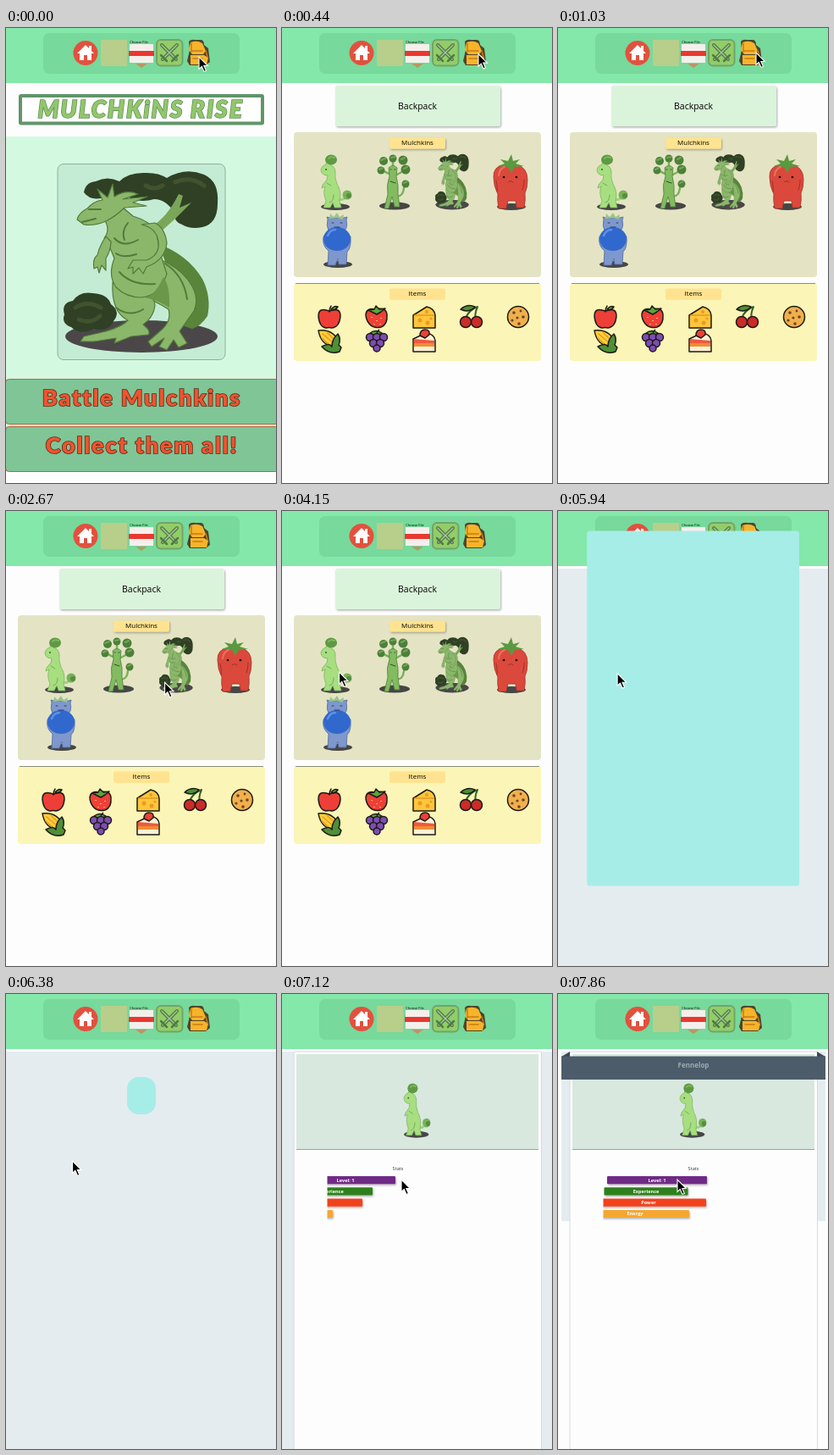
These frames come from a looping animation (319x537 px, 8 s). An HTML page:

```html
<!DOCTYPE html>
<html lang="en">
<head>
<meta charset="utf-8">
<title>Mulchkins Rise</title>
<style>
html, body { margin: 0; height: 100%; overflow: hidden; background: #fdfdfd; }
svg { display: block; width: 100%; height: 100%; }
text { text-anchor: middle; font-family: "Open Sans", "Noto Sans", sans-serif; }
.fancy { font: 900 27px Lato, sans-serif; letter-spacing: 1.8px; fill: #ee5430; stroke: #5a2a18; stroke-width: 1.6px; paint-order: stroke; }
.title { font: italic 900 28px Lato, sans-serif; letter-spacing: 1.9px; fill: #93c66c; stroke: #5d9055; stroke-width: 1.5px; paint-order: stroke; }
.small { font-size: 8px; }
.tiny text { font: 700 5.6px "Open Sans", sans-serif; fill: #fff; }
.food { stroke: #1d1a16; stroke-width: 1.5; stroke-linejoin: round; }
.line { fill: none; stroke-linecap: round; }
</style>
</head>
<body>
<svg viewBox="0 0 319 537" preserveAspectRatio="none">
<defs>
  <filter id="shade" x="-10%" y="-20%" width="120%" height="160%"><feDropShadow dx="1" dy="1.5" stdDeviation="1.2" flood-opacity=".3"/></filter>
  <clipPath id="barClip"><rect x="53.5" y="190" width="214" height="90"/></clipPath>

  <g id="dragon">
    <ellipse cx="160" cy="364" rx="90" ry="19" fill="#4b4749"/>
    <g fill="#2f4025">
      <path d="M92 194q2-12 14-13q14-7 28 0q10-10 28-10q18-1 28 6q22-13 44-4q18 8 16 34q0 24-18 28q-14 3-24-3q-10-3-9-14q-10-16-24-16q-16 5-30-2q-14 5-26-1q-18 7-27-5z"/>
      <path d="M69 338q-4-14 10-16q8-12 24-9q17 1 21 13q12 9 3 20q-5 13-23 9q-17 8-27-2q-12-4-8-15z"/>
    </g>
    <path d="M200 182q18-8 34 4M165 186q10 6 20 0M82 330q14-9 30 0M86 344q14 6 25-4" class="line" stroke="#40532f" stroke-width="5"/>
    <path d="M172 234q18-10 32-38l5 2-4 14 14-6-20 20-18 16z" fill="#7aa659"/>
    <path d="M180 255q34 12 52 41q11 22 6 44q-8 12-18 15l-15-5q9-30-9-54z" fill="#58853a"/>
    <g fill="#8bb76b" stroke="#527a3a" stroke-width="1.2" stroke-linejoin="round">
      <path d="M150 268q40 0 64 28q16 20 8 38q-10 14-17 24l9 14-10 5-6-9-8 12-9-4 6-10-15 10-4-6 16-14q12-11 8-24q-16-10-32-16z"/>
      <path d="M126 300q14 18 34 12q16 4 16 16q-2 14-14 22q10 8 6 12l-20 2-20 8 2-6-26 4h-16l4-6 26-6q20-6 26-13q-20-10-18-45z"/>
      <path d="M116 226q8 12 0 22q8 12 12 24q-8 20 2 34q12 12 30 12q22-2 30-28q-10-28-12-50q-8-12-28-18q-10-8-18-16z"/>
      <path d="M84 226q2-8 12-13q8-9 18-10l-6-13 12 10 6-16 2 15q14-9 28-3l-18 6 29-3-17 7 16 4-26 2q-10 10-22 16q-14 6-26 4z"/>
      <path d="M118 246q-8 12-10 22q-6 4-4 16l4-2 2 7 3-9 5 6v-14q6-10 6-20z"/>
      <path d="M160 232q18 4 20 20q2 16-14 22h-16l-6 10 6-2v8l7-7 5 7 4-8q22-8 24-28q-2-18-14-24z"/>
    </g>
    <path d="M128 248q10 12 28 2M130 266q8 6 24 1M134 288q14 16 42 14M144 230q-8 10-4 20M188 278q22 14 26 42M130 330q16 12 32 2M98 214l14 0M90 229l16-4" class="line" stroke="#527a3a" stroke-width="2"/>
    <path d="M164 318q12-2 22-24q8 10 7 36q-14-9-29-12z" fill="#6a9749"/>
  </g>

  <g id="sprout">
    <ellipse cx="20" cy="62" rx="17" ry="4" fill="#454645"/>
    <path d="M23 53q7 2 9-3" class="line" stroke="#9dd577" stroke-width="3"/>
    <circle cx="34" cy="48" r="5.5" fill="#77b257"/><circle cx="36" cy="49" r="3" fill="#588d40"/>
    <path d="M3 19q0-5 6-7l1-5 3 5q7 2 7 9q-1 7 2 14q6 10 3 20l2 8h-8l-2-6-3 6H6l3-8q-4-9-1-17l-4 2 1-4 5-6 1-5q-7 0-8-6z" fill="#a6de80" stroke="#78ad5a" stroke-width=".7"/>
    <path d="M10 34l5 3M13 57q5-1 5-9" class="line" stroke="#75ab58"/>
    <ellipse cx="15" cy="6.500" rx="7" ry="6" fill="#5e9a43"/><path d="M12 5q3-3 7-1" class="line" stroke="#7eb85c" stroke-width="2"/>
    <circle cx="9" cy="18" r=".9" fill="#33492a"/>
  </g>

  <g id="arrow"><path d="M0 0V14.5L3.3 11.4 6 17.4 8.4 16.4 5.8 10.5H10.4Z" stroke="#fff" stroke-width="1.1"/></g>
</defs>

<rect width="319" height="537" fill="#fdfdfd"/>

<g id="home">
  <rect y="128" width="319" height="396" fill="#d3fae1"/>
  <rect x="17" y="80" width="286" height="32.5" rx="1" fill="#fff" stroke="#619568" stroke-width="4"/>
  <text class="title" x="159" y="106">MULCHKiNS RISE</text>
  <rect x="61" y="160.500" width="198" height="231" rx="7" fill="#c4ecd4" stroke="#91ad9b"/>
  <use href="#dragon"/>
  <g fill="#7fc596" stroke="#b5653f">
    <rect x="-.5" y="414.500" width="323" height="53" rx="4"/>
    <rect x="-.5" y="470.500" width="323" height="53" rx="4"/>
  </g>
  <text class="fancy" x="160.500" y="446">Battle Mulchkins</text>
  <text class="fancy" x="160.500" y="502">Collect them all!</text>
</g>

<g id="pack">
  <rect x="63" y="68" width="195" height="48" rx="3" fill="#daf4db" filter="url(#shade)"/>
  <text x="160" y="96" font-size="10.500">Backpack</text>
  <rect x="14" y="123" width="292" height="171" rx="4" fill="#e4e4c4"/>
  <rect x="14" y="301" width="292" height="92" rx="4" fill="#fbf5b7"/>
  <path d="M16 301.500H304" stroke="#8b8a76"/>
  <g fill="#ffe390"><rect x="127" y="129.500" width="66" height="13" rx="2" filter="url(#shade)"/><rect x="127" y="307.500" width="66" height="13.500" rx="2"/></g>
  <text class="small" x="160" y="138">Mulchkins</text>
  <text class="small" x="160" y="316">Items</text>

  <use href="#sprout" x="43" y="149"/>

  <g transform="translate(112 149)">
    <ellipse cx="21" cy="61" rx="18" ry="4.500" fill="#454645"/>
    <path d="M23 50q8 0 9-10M19 25L8 20M22 25l11-6M19 18V9" class="line" stroke="#79b259" stroke-width="2.5"/>
    <path d="M14 16q5-5 10 0l-1 10q3 10 2 21l2 15h-6l-3-12-4 14H9l4-17q-2-11 2-21z" fill="#82bb60" stroke="#527f3d" stroke-width=".8"/>
    <g fill="#4d803a"><circle cx="8" cy="8" r="5"/><circle cx="19" cy="5" r="4.500"/><circle cx="31" cy="7" r="5.500"/><circle cx="5" cy="19" r="4.500"/><circle cx="34" cy="18" r="5.500"/><circle cx="34" cy="35" r="4.500"/></g>
    <path d="M5 7l5-2M17 4l5-1M29 6l4-2M3 18l4-2M32 17l4-2M32 34l4-2" class="line" stroke="#71a554" stroke-width="2"/>
    <path d="M16 18h1m4 0h1M16 32l6 2" class="line" stroke="#32502a"/>
  </g>

  <use href="#dragon" transform="translate(181 149) scale(.218 .307) translate(-68 -170)"/>

  <g transform="translate(249 149)">
    <ellipse cx="22" cy="62" rx="17" ry="4" fill="#454645"/>
    <path d="M1 27q-1-13 14-15h12q14 3 14 18q0 10-3 16q1 8-1 17h-9l-1-8h-9l-2 9H7q-2-10-1-17q-5-9-5-20z" fill="#db493c" stroke="#a53228" stroke-width=".8"/>
    <path d="M6 14l8-3-5-5 9 2 4-8 2 8 8-2-5 5 10 3-11 1-4 7-4-7z" fill="#5a9940"/>
    <path d="M4 31q2 9 1 13M37 30q0 8-2 12M18 33q3-3 6 0" class="line" stroke="#9d3028"/>
    <circle cx="13" cy="27" r="1.300"/><circle cx="28" cy="27" r="1.300"/>
    <path d="M7 25q1-8 7-10" class="line" stroke="#ea7263" stroke-width="2"/>
  </g>

  <g transform="translate(47 217)">
    <ellipse cx="19" cy="62" rx="17" ry="4" fill="#454645"/>
    <path d="M7 9l-1-3 4 1h16l4-1-1 4q2 8-2 12l7 7q1 14-4 18l-1 15H20l-1-7-3 8H7l1-17Q0 40 2 29l6-7q-3-6-1-13z" fill="#7e97cc" stroke="#526a9e" stroke-width=".8"/>
    <ellipse cx="18" cy="32" rx="16" ry="14" fill="#3168cd"/>
    <path d="M7 28q3-7 9-7" class="line" stroke="#5e90e6" stroke-width="2.500"/>
    <path d="M9 8l1-6 4 4 4-5 3 5 5-3-1 6-7-2z" fill="#9cc48a"/>
    <path d="M12 13h2m8 0h2M15 18h6" class="line" stroke="#2e3d63"/>
  </g>

  <g class="food">
    <g transform="translate(56 341)">
      <path d="M0-7q-13-5-13 6q1 13 9 14q4-1 7 0q9-1 10-14q0-11-13-6z" fill="#ed3f37"/>
      <path d="M0-6q0-4 2-7" class="line"/><path d="M2-9q4-5 8-3q-3 5-8 3z" fill="#64ae38"/>
    </g>
    <g transform="translate(112 341)">
      <path d="M-13-3q1-8 11-6q13-3 14 6q1 12-7 15q-9 2-14-4q-4-5-4-11z" fill="#ef4037"/>
      <path d="M-10-8l7-1 2-4 4 4 7-1-5 4-5 3-4-2z" fill="#5ba638"/>
      <path d="M-6 0v1M0 4v1M5 1v1M-3 8v1M4 8v1" stroke="#ffd27a"/>
    </g>
    <g transform="translate(168 341)">
      <path d="M-13-2L3-12q9 2 10 10v15h-26z" fill="#ffc63b"/><path d="M-12-2h24" stroke="#e09a25"/>
      <g fill="#e89b24" stroke="none"><circle cx="-5" cy="4" r="2.500"/><circle cx="4" cy="7" r="2.500"/><circle cx="8" cy="2" r="1.500"/><circle cx="3" cy="-6" r="2"/></g>
    </g>
    <g transform="translate(223 341)">
      <path d="M-6 2Q-3-8 8-12Q4-3 6 3" class="line" stroke="#35602a" stroke-width="2"/>
      <path d="M-12-9q8-7 17-3q-7 8-17 3z" fill="#4d8f36"/>
      <circle cx="-6" cy="6" r="6.500" fill="#cb2c28"/><circle cx="7" cy="6" r="6.500" fill="#cb2c28"/>
    </g>
    <g transform="translate(279 341)">
      <circle r="12.500" fill="#f0b04c"/>
      <g fill="#714321" stroke="none"><circle cx="-5" cy="-5" r="1.800"/><circle cx="3" cy="-7" r="1.400"/><circle cx="6" cy="0" r="1.800"/><circle cx="-1" cy="1" r="1.600"/><circle cx="-7" cy="4" r="1.600"/><circle cx="1" cy="8" r="1.800"/></g>
    </g>
    <g transform="translate(56 369)">
      <path d="M6 7Q-10 6-13-12Q5-14 11 2z" fill="#ffcf3a"/>
      <path d="M-8-8L6 4M-3-10l9 9M-9-3l8 7" class="line" stroke="#e79b22"/>
      <path d="M-9 7q9-5 12 0q0-9 7-15q4 6 1 13l3 3-2 5q-12 4-21-6z" fill="#4f8f37"/>
    </g>
    <g transform="translate(112 369)" fill="#7d4db3">
      <path d="M0-7q0-4 3-6M-8-9Q-1-14 6-9Q-1-4-8-9" fill="#5da43c"/>
      <circle cx="-8" cy="-4" r="4.500"/><circle cx="0" cy="-4" r="4.500"/><circle cx="8" cy="-4" r="4.500"/><circle cx="-4" cy="3" r="4.500"/><circle cx="4" cy="3" r="4.500"/><circle cx="0" cy="9" r="4"/>
    </g>
    <g transform="translate(168 369)">
      <path d="M-13-2L2-9q10 1 11 9v13h-26z" fill="#fff2d6"/>
      <path d="M-12 3h24v4h-24z" fill="#f28c35" stroke="none"/><path d="M-12-2L12 0v3h-24z" fill="#ee5a3e" stroke="none"/>
      <path d="M-5-6q0-7 6-7t5 6l-5 4z" fill="#ec4038"/>
    </g>
  </g>
</g>

<g id="detail">
  <rect id="backdrop" y="68" width="319" height="469" fill="#e4ecf0"/>
  <g id="card">
    <rect x="14" y="68" width="292.500" height="471" rx="2" fill="#fdfdfd" stroke="#d5dade"/>
    <rect x="17" y="71" width="286" height="112" fill="#d8e8df"/>
    <path d="M17 183.500H303" stroke="#98a59e"/>
    <use href="#sprout" transform="translate(141.500 105) scale(.86 .98)"/>
    <text id="stats" y="208" font-size="5.600" fill="#333">Stats</text>
    <g id="bars" class="tiny" clip-path="url(#barClip)"></g>
    <g id="ribbon">
      <path d="M4 74L14 68V74ZM316 74L306 68V74Z" fill="#3c4954"/>
      <rect x="4" y="73.500" width="312" height="27.500" fill="#4d5c6a"/>
      <text x="160" y="87" font-size="8" font-weight="700" fill="#a0aab2">Fennelop</text>
    </g>
  </g>
</g>

<g id="nav">
  <rect width="319" height="65" fill="#84e8aa"/>
  <rect x="44" y="6" width="232" height="48" rx="7" fill="#77d99b"/>
  <circle cx="94" cy="29.500" r="14.500" fill="#e2513e"/>
  <path d="M84 30l10-10 4 4v-3h3v6l3 3h-3v8h-5v-6h-4v6h-5v-8z" fill="#fff"/>
  <rect x="112" y="14" width="31" height="31" fill="#b8cf8b"/>
  <path d="M153 42h14l-7 5z" fill="#b49865"/>
  <rect x="146" y="19" width="28" height="22" fill="#f5efec"/>
  <rect x="145" y="27" width="30" height="6" fill="#e8382f"/>
  <text x="157" y="17.500" font-size="4">Choose File</text>
  <rect x="178" y="14" width="30.500" height="30.500" rx="5" fill="#92cd68" stroke="#70a56a" stroke-width="2"/>
  <g class="line"><path d="M184 20l17 17M202 20l-17 17" stroke="#517a47" stroke-width="4"/><path d="M184 20l17 17M202 20l-17 17" stroke="#a5c69a" stroke-width="1.500"/><path d="M183 32l7 7M203 32l-7 7" stroke="#517a47" stroke-width="2.500"/></g>
  <path d="M216 16q2-3 8-2h7q3 1 3 6l5 4 2 16-5 4h-19l-3-5 3-13z" fill="#4e4430"/>
  <path d="M218 17q8-3 14 1l4 9-3 4h-13l-4-5zM218 32h16l5 3-2 8h-19z" fill="#f6b42b"/>
  <path d="M219 27h13M221 36h11M219 18v10M236 27l2 7" class="line" stroke="#c77b16" stroke-width="1.500"/>
</g>

<rect id="cover" fill="#a6ede8"/>
<use id="cursor" href="#arrow"/>
</svg>

<script>
const LOOP = 8000;
const $ = id => document.getElementById(id);
const clamp = v => Math.min(1, Math.max(0, v));
const mix = (a, b, k) => a + (b - a) * k;
const part = (t, from, to) => clamp((t - from) / (to - from));
const show = (id, on) => $(id).style.display = on ? '' : 'none';
const set = (el, attrs) => { for (const k in attrs) el.setAttribute(k, attrs[k]); };

// The screen refreshes in bursts: [first change, last change, steps]
const bursts = [[0, 0, 1], [150, 1030, 7], [1780, 2810, 8], [2960, 2960, 1],
  [3410, 4150, 6], [5040, 5040, 1], [5940, 6830, 7], [7120, 7860, 6]];

function snap(t) {
  const [a, b, n] = bursts.findLast(s => t >= s[0]);
  if (n === 1) return a;
  const gap = (b - a) / (n - 1);
  // Refreshes fall on whole 10 ms, so allow for rounding.
  return a + Math.min(n - 1, Math.floor((t - a + 7) / gap)) * gap;
}

// [time, x, y]
const path = [[0, 228, 34], [150, 228, 34], [590, 234, 29], [1630, 234, 29], [2810, 181, 227],
  [2960, 180, 238], [3260, 180, 238], [3560, 165, 296], [4150, 67.5, 190],
  [5800, 67.5, 190], [6385, 78.5, 197], [6830, 141, 219], [LOOP, 141, 219]];

function cursorAt(t) {
  const i = path.findIndex(p => p[0] > t);
  const [a, b] = [path[i - 1], path[i]];
  const k = part(t, a[0], b[0]);
  return [mix(a[1], b[1], k), mix(a[2], b[2], k)];
}

// label, colour, width, top, first centre, last centre
const bars = [
  ['Level: 1', '#702b85', 118, 215, 75, 117],
  ['Experience', '#2f801f', 99, 228.3, 57.5, 104],
  ['Power', '#f2431f', 136, 241.6, 27, 107],
  ['Energy', '#f5a733', 128, 254.9, -4, 91]];

$('bars').innerHTML = bars.map(([label, color, w, y]) =>
  `<g><rect x="${-w / 2}" y="${y}" width="${w}" height="9.2" rx="1" fill="${color}" filter="url(#shade)"/>
  <text y="${y + 6.5}">${label}</text></g>`).join('');

function draw(time) {
  const t = snap(time);
  show('home', t < 440);
  show('pack', t >= 440 && t < 5040);
  show('detail', t >= 5040);
  show('card', t >= 7120);

  const [x, y] = cursorAt(t);
  set($('cursor'), { x, y });

  const k = part(t, 5800, 6385), s = 1 - part(t, 6385, 6680);
  const w = mix(319, 34, k) * s, h = mix(537, 44, k) * s;
  show('cover', t >= 5040 && s > 0);
  set($('cover'), { x: mix(159.5, 160, k) - w / 2, y: mix(268.5, 120, k) - h / 2,
    width: w, height: h, rx: 14 * k * s });

  const p = part(t, 7120, 7860), slide = p * (2 - p);
  bars.forEach((b, i) =>
    set($('bars').children[i], { transform: `translate(${mix(b[4], b[5], slide)} 0)` }));
  set($('stats'), { x: mix(137, 160, slide) });

  const open = part(t, 7260, 7700);
  set($('ribbon'), { opacity: open });
  set($('backdrop'), open > .5 ? { x: 4, width: 312, height: 200 } : { x: 0, width: 319, height: 469 });
}

const start = performance.now();
function tick() {
  draw((performance.now() - start) % LOOP);
  requestAnimationFrame(tick);
}
tick();
</script>
</body>
</html>
```
